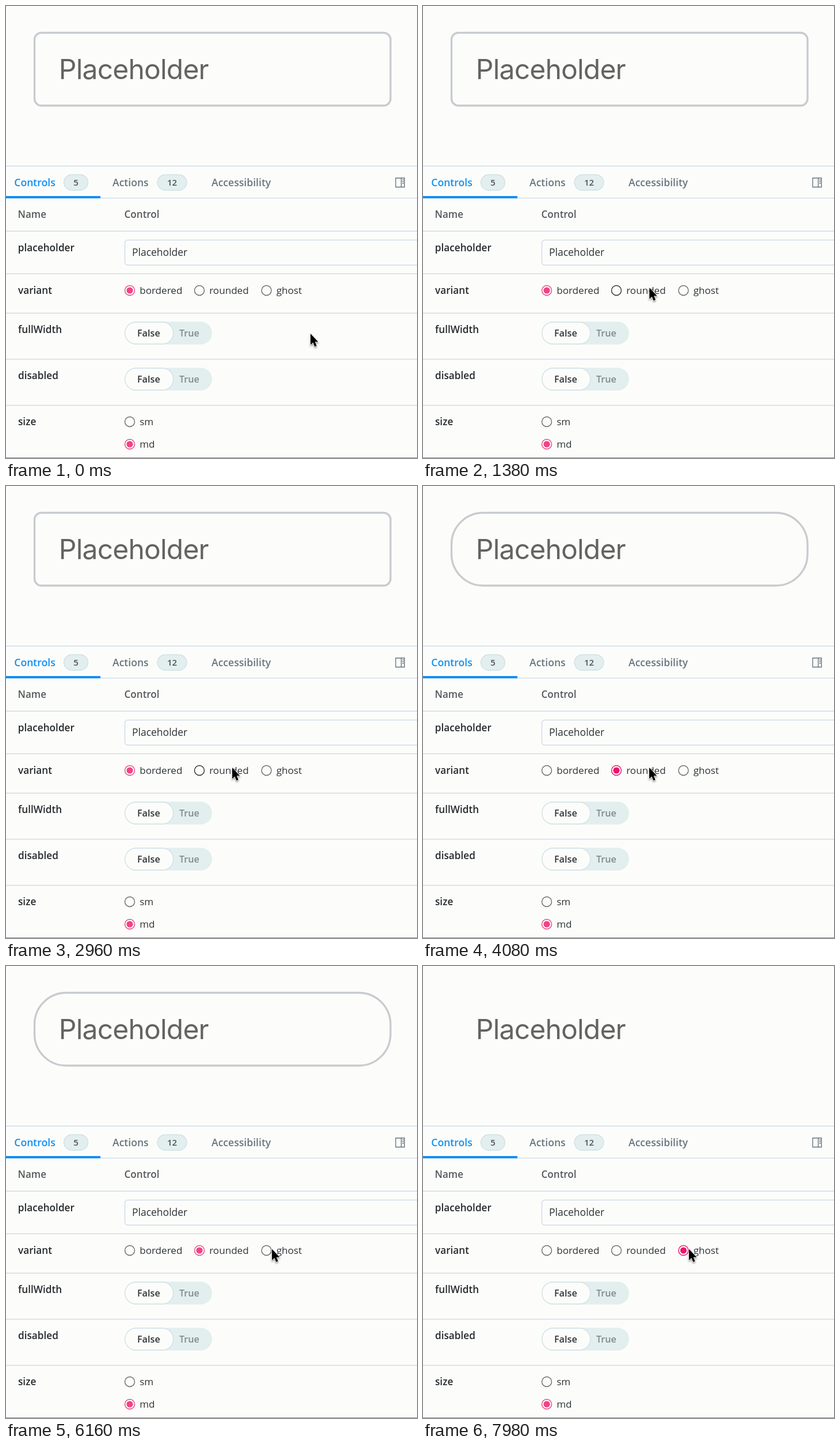
An HTML page for the animation above (8000 ms loop, 714 by 785 pixels).

```html
<!DOCTYPE html>
<html lang="en">
<head>
<meta charset="utf-8">
<title>Input controls</title>
<style>
  html, body { margin: 0; width: 100%; height: 100%; overflow: hidden; background: #fcfdfa; }
  svg { display: block; width: 100vw; height: 100vh; }
  text { font: 17.1px "Open Sans", "Noto Sans", sans-serif; fill: #2e3338; }
  .bold { font-weight: 600; font-size: 17.2px; fill: #25292d; }
  .head { font-weight: 600; font-size: 17.1px; fill: #55595d; }
  .tab { font-weight: 600; font-size: 17.6px; fill: #687580; }
  .active { fill: #128ff2; }
  .count { font-weight: 600; font-size: 15px; fill: #4a5459; text-anchor: middle; }
  .choice { font-weight: 600; font-size: 16.2px; }
  .off { fill: #7d898d; }
  .field { font-size: 17.5px; }
  .big { font: 48px Inter, "Liberation Sans", sans-serif; letter-spacing: -.8px; fill: #636363; }
  .line { stroke: #d2dbea; stroke-width: 1.5; fill: none; }
  .pill { fill: #e3eeef; }
  .edge { stroke: #d0e1e8; stroke-width: 1.3; }
</style>
</head>
<body>
<svg id="stage" viewBox="0 0 714 785">
  <rect id="preview" x="49.5" y="46.5" width="618.5" height="126.5" fill="none" stroke="#c8cbd1" stroke-width="3.4"/>
  <text class="big" x="91.8" y="127">Placeholder</text>

  <path class="line" d="M0 278H714M0 333.5H714M0 391H714M0 465H714M0 533.5H714M0 613.5H714M0 693.5H714"/>
  <rect y="330" width="164" height="4" fill="#128ff2"/>
  <text class="tab active" x="14.3" y="313">Controls</text>
  <text class="tab" x="185" y="313">Actions</text>
  <text class="tab" x="357" y="313">Accessibility</text>
  <rect class="pill edge" x="100.5" y="293" width="42" height="27" rx="13.5"/>
  <text class="count" x="121.5" y="312">5</text>
  <rect class="pill edge" x="263" y="293" width="51" height="27" rx="13.5"/>
  <text class="count" x="288.5" y="312">12</text>
  <g fill="none" stroke="#687580" stroke-width="1.4">
    <path d="M677 298.7H692.3V314.5H677ZM686.6 298.7V314.5"/>
    <path d="M688.5 302H691M688.5 305H691M688.5 308H691"/>
  </g>

  <text class="head" x="20.5" y="368">Name</text>
  <text class="head" x="205.5" y="368">Control</text>
  <text class="bold" x="20.8" y="425.5">placeholder</text>
  <rect class="line" x="206.5" y="406.5" width="530" height="43.5" rx="5"/>
  <text class="field" x="219" y="434">Placeholder</text>
  <text class="bold" x="21" y="500">variant</text>
  <text class="bold" x="21" y="568">fullWidth</text>
  <text class="bold" x="21" y="648">disabled</text>
  <text class="bold" x="21" y="728">size</text>
  <g id="controls"></g>
  <rect y="784" width="714" height="1" fill="#8b9673"/>

  <g id="cursor" style="filter: drop-shadow(0 2px 1.5px #0006)">
    <path d="M0 0V19.5L4.4 15.6 7.3 22.6 10.7 21.2 7.8 14.3H13.3Z" fill="#000" stroke="#fff" stroke-width="1.4" paint-order="stroke"/>
  </g>
</svg>
<script>
const LOOP = 8000, PICK_ROUNDED = 3360, PICK_GHOST = 7200;
const byId = id => document.getElementById(id);
const controls = byId("controls"), preview = byId("preview"), cursor = byId("cursor");

const radio = (x, y, label) => `<g class="radio">
  <circle cx="${x}" cy="${y}" r="8.5" fill="none" stroke-width="1.4"/>
  <circle cx="${x}" cy="${y}" r="5.6"/>
  <text x="${x + 17.2}" y="${y + 6}">${label}</text></g>`;

const toggle = y => `<rect class="pill" x="206" y="${y}" width="152" height="39.5" rx="19.7"/>
  <rect class="edge" x="206.7" y="${y + .7}" width="84" height="38" rx="19" fill="#fcfdfa"/>
  <text class="choice" x="228" y="${y + 25.5}">False</text>
  <text class="choice off" x="301" y="${y + 25.5}">True</text>`;

controls.innerHTML = radio(215, 494, "bordered") + radio(336, 494, "rounded") +
  radio(452.5, 494, "ghost") + radio(215, 722, "sm") + radio(215, 761, "md") +
  toggle(548.3) + toggle(628.3);
const radios = [...controls.querySelectorAll(".radio")];

function paintRadio(group, selected, hot) {
  const [ring, dot] = group.children;
  const pink = hot ? "#ed136f" : "#ee4489";
  ring.setAttribute("stroke", selected ? pink : hot ? "#2e3338" : "#666b70");
  dot.setAttribute("fill", selected ? pink : "none");
}

function ease(t, start, end) {
  const u = Math.min(1, Math.max(0, (t - start) / (end - start)));
  return u * u * (3 - 2 * u);
}

function draw(t) {
  const approach = ease(t, 400, 1410), across = ease(t, 5230, 6130);
  const x = 529 - 136 * approach + 69 * across;
  const y = 569 - 80 * approach ** .77 + 2.5 * across;
  cursor.setAttribute("transform", `translate(${x} ${y})`);

  const variant = t < PICK_ROUNDED ? 0 : t < PICK_GHOST ? 1 : 2;
  const hovered = y < 505 && x < 424 ? 1 : variant === 2 ? 2 : -1;
  for (let i = 0; i < 3; i++) paintRadio(radios[i], i === variant, i === hovered);
  preview.setAttribute("rx", variant ? 55 : 12);
  preview.setAttribute("visibility", variant === 2 ? "hidden" : "visible");
}

paintRadio(radios[3], false, false);
paintRadio(radios[4], true, false);

function tick() {
  draw(performance.now() % LOOP);
  requestAnimationFrame(tick);
}
tick();
</script>
</body>
</html>
```
